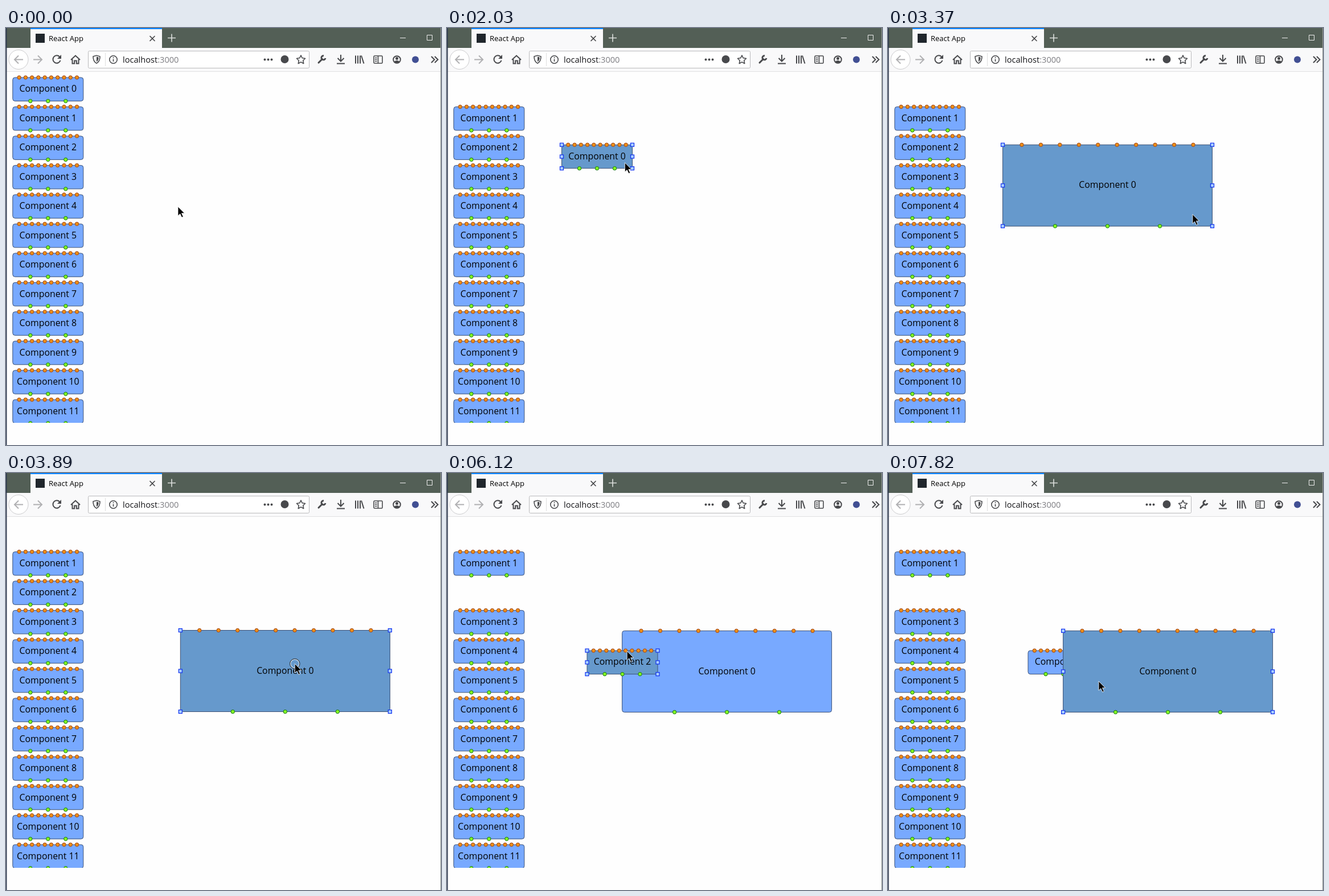
Write an HTML page that moves like this. It is 764x733 px and loops after 8 s.

```html
<!DOCTYPE html>
<html lang="en">
<head>
<meta charset="utf-8">
<title>Draggable components</title>
<style>
  html, body { margin: 0; width: 100%; height: 100%; overflow: hidden; background: #fefefe; }
  svg { display: block; width: 764px; height: 733px; }
  text { font-family: "Open Sans", "Noto Sans", sans-serif; }
  .label { font-size: 15.8px; text-anchor: middle; }
  .body { stroke: #3a5075; }
  .in { fill: #ee9016; stroke: #9c4420; }
  .out { fill: #84fb22; stroke: #14701a; }
  .grip { fill: #a9d0ff; stroke: #1030f0; stroke-width: 1.2; }
  .grip.on { fill: #1767c4; stroke: #04203f; }
  .icon { fill: none; stroke: #48494c; stroke-width: 2; }
  .thin { stroke-width: 1.6; }
  .dim { stroke: #b0b0b2; }
  .solid { fill: #48494c; stroke: none; }
</style>
</head>
<body>
<svg viewBox="0 0 764 733">
  <defs><clipPath id="view"><path d="M0 77H764V694H0Z"/></clipPath></defs>
  <rect width="764" height="733" fill="#fefefe"/>

  <rect width="764" height="35" fill="#535f56"/>
  <rect x="43" width="231" height="35" fill="#f9f9fa"/>
  <rect x="43" width="231" height="2" fill="#0a84ff"/>
  <rect x="52" y="10" width="16" height="16" fill="#20262c"/>
  <text x="75" y="22.5" font-size="13">React App</text>
  <path class="icon thin" d="M252.5 14l9 9m0-9l-9 9"/>
  <path class="icon thin" style="stroke:#dde0dd" d="M284 17.5h14m-7-7v14"/>
  <path class="icon" style="stroke:#eee;stroke-width:1" d="M692 17.5h10M739.5 12.5h9v9h-9z"/>

  <rect y="35" width="764" height="41" fill="#f9f9fa"/>
  <path d="M0 76.5H764" stroke="#e0e0e2"/>
  <circle cx="22" cy="55.5" r="17" fill="#fff" stroke="#cbcbcd"/>
  <path class="icon dim" d="M30 55.5H15m7-7l-7 7 7 7M48 55.5H63m-7-7l7 7-7 7"/>
  <path class="icon" d="M94.5 51a6.7 6.7 0 1 0 1 6"/>
  <path class="solid" d="M97 47v7h-7z"/>
  <path class="icon" d="M114 56l8-7.500 8 7.500M116.500 55v7.500h3.700v-5h3.600v5h3.700V55"/>

  <rect x="144.5" y="40.5" width="388" height="30" rx="2" fill="#fff" stroke="#b9b9bb"/>
  <path class="icon thin" d="M153 50l6-1.700 6 1.700c0 6-2 10-6 12-4-2-6-6-6-12z"/>
  <path class="solid" d="M159 50.500l3.700 1c0 4-1.500 6.500-3.700 8z"/>
  <path d="M174.5 44v23" stroke="#dededf"/>
  <circle class="icon thin" cx="188.5" cy="55.5" r="6.7"/>
  <path class="icon thin" d="M188.5 54.500v4.500m0-7.700v1.600"/>
  <text x="205" y="60.7" font-size="14.6" fill="#151518">localhost<tspan fill="#7c7c80">:3000</tspan></text>
  <path class="icon" style="stroke-width:4;stroke-linecap:round" d="M454.5 55.5h.01m6 0h.01m6 0h.01"/>
  <circle class="solid" cx="489.5" cy="55" r="7"/>
  <path class="icon thin" stroke-linejoin="round" d="M518 48l2.300 4.800 5.200.7-3.800 3.700 1 5.300-4.700-2.600-4.700 2.600 1-5.300-3.800-3.700 5.200-.7z"/>

  <path class="icon" style="stroke-width:3;stroke-linecap:round" d="M549 61l6.500-6.500"/>
  <path class="icon" style="stroke-width:2.8" d="M558 48.800a3.600 3.600 0 1 0 3 4.200"/>
  <path class="icon" d="M588 47v11m-5.500-5l5.500 5.500 5.500-5.500M581 62.500h14"/>
  <path class="icon" d="M614 48.500v14m4-14v14m4-14v14m2-14l4.500 14"/>
  <rect class="icon thin" x="646" y="49" width="15" height="13" rx="1.5"/>
  <path class="icon thin" d="M653.5 49v13m-5.500-9.500h3.500m-3.500 3h3.500m-3.500 3h3.500"/>
  <circle class="icon" cx="686.5" cy="55.5" r="6.3"/>
  <path class="solid" d="M681.5 59q5-4 10 0l-2 3h-6z"/>
  <circle class="solid" cx="686.5" cy="53.5" r="2.5"/>
  <circle cx="719" cy="55.5" r="6" fill="#414f93"/>
  <path class="icon" d="M747 50l5.500 5.500-5.500 5.500m6-11l5.500 5.500-5.500 5.500"/>
  <path d="M.7 0V733" stroke="#26324a" stroke-width="1.4"/>
  <path d="M763.5 0V733" stroke="#8f9692"/>

  <g clip-path="url(#view)"><g id="list"></g><g id="movers"></g></g>
  <g id="cursor">
    <g id="press" fill="none">
      <circle r="7.6" stroke="#fff" stroke-width="1.8" stroke-opacity=".6"/>
      <circle r="8.7" stroke="#222"/>
    </g>
    <path d="M0 0V16.200L3.800 12.700 6.700 19 9.300 17.800 6.500 11.700H11.600Z" stroke="#fff" stroke-width=".8"/>
  </g>
</svg>
<script>
const LOOP = 8000, TICK = 88.6, LAST = 88;
const W = 124, H = 41.4, LEFT = 11.8;
const LAG = 0.8; // ticks by which the page trails the pointer
const $ = id => document.getElementById(id);
const home = i => [LEFT, 87 + 51.48 * i];

const easeIn = f => f * f;
const easeOut = f => 1 - (1 - f) ** 3;
const easeBoth = f => f * f * (3 - 2 * f);

// Pointer moves: start tick, end tick, target, easing.
const start = [302, 314];
const moves = [
  [0, 9, [89.5, 104], easeBoth],
  [11, 21, [279.2, 222.3], easeOut],
  [21, 24, [324, 241.8], easeBoth],
  [24, 31, [444, 324], easeIn],
  [31, 37, [568, 343.4], easeOut],
  [37, 40.5, [401.2, 263.2], easeBoth],
  [40.5, 44, [507.3, 335.3], easeOut],
  [45, 56, [91.8, 209.8], easeBoth],
  [57.5, 67.5, [326, 332], easeOut],
  [68, 71, [288, 259], easeBoth],
  [72, 75, [335, 290], easeBoth],
  [76, 78, [326, 332], easeIn],
  [78, 82, [370, 366], easeBoth]
];
const presses = [[11, 21], [24, 37], [40.5, 45], [57.5, 67.5], [71, 72], [82, 84]];

const clamp = (v, lo, hi) => Math.min(hi, Math.max(lo, v));
const add = (...points) => points.reduce(([a, b], [x, y]) => [a + x, b + y]);

function pointer(k) {
  return moves.reduce(([x, y], [a, b, [tx, ty], ease]) => {
    const f = ease(clamp((k - a) / (b - a), 0, 1));
    return [x + (tx - x) * f, y + (ty - y) * f];
  }, start);
}

// Pointer travel seen by the page while the button is held from a to b.
function drag(k, a, b) {
  const [x0, y0] = pointer(a), [x, y] = pointer(clamp(k - LAG, a, b));
  return [x - x0, y - y0];
}

const ports = (n, cls, b, y) => Array.from({ length: n }, (_, i) =>
  `<circle class="${cls}" cx="${b.x + b.w * (i + 1) / (n + 1)}" cy="${y}" r="3.2"/>`).join('');

function grips(b, resizing) {
  let out = '';
  for (const u of [0, 1]) for (const v of [0, .5, 1]) {
    const on = resizing && u === 1 && v === 1 ? ' on' : '';
    out += `<rect class="grip${on}" x="${b.x + b.w * u - 3}" y="${b.y + b.h * v - 3}" width="6" height="6"/>`;
  }
  return out;
}

function component(b, fill = '#78a9ff', extra = '') {
  return `<rect class="body" x="${b.x}" y="${b.y}" width="${b.w}" height="${b.h}" rx="4" fill="${fill}"/>` +
    `<text class="label" x="${b.x + b.w / 2}" y="${b.y + b.h / 2 + 4.6}">Component ${b.id}</text>` +
    ports(10, 'in', b, b.y) + ports(3, 'out', b, b.y + b.h) + extra;
}

function box(id, [x, y] = home(id), [w, h] = [W, H]) {
  return { id, x, y, w, h };
}

const inside = (b, [x, y]) => x >= b.x && x <= b.x + b.w && y >= b.y && y <= b.y + b.h;

function selectedAt(k) {
  if (k < 11 || (k >= 72 && k < 82)) return -1;
  return k >= 57.5 && k < 72 ? 2 : 0;
}

function draw(k) {
  const pressed = presses.some(([a, b]) => k >= a && k < b);
  const order = [
    box(2, add(home(2), drag(k, 57.5, 67.5))),
    box(0, add(home(0), drag(k, 11, 21), drag(k, 40.5, 44)), add([W, H], drag(k, 24, 37)))
  ];
  if (k >= 57.5 && k < 82) order.reverse();

  const seen = pointer(k - LAG);
  const hover = pressed ? null : [...order].reverse().find(b => inside(b, seen));
  const selected = selectedAt(k);
  const resizing = k >= 24 && k < 37;

  $('movers').innerHTML = order.map(b =>
    b.id === selected ? component(b, '#6699cc', grips(b, resizing))
      : component(b, b === hover ? '#b0e0ff' : undefined)).join('');
  $('cursor').setAttribute('transform', `translate(${pointer(k)})`);
  $('press').style.display = pressed ? '' : 'none';
}

$('list').innerHTML = Array.from({ length: 12 }, (_, i) => i)
  .filter(i => i !== 0 && i !== 2).map(i => component(box(i))).join('');

let shown = -1;
function frame() {
  const t = performance.now() % LOOP;
  const k = Math.min(LAST, Math.floor((t + 15) / TICK));
  if (k !== shown) draw(shown = k);
  requestAnimationFrame(frame);
}
frame();
</script>
</body>
</html>
```
